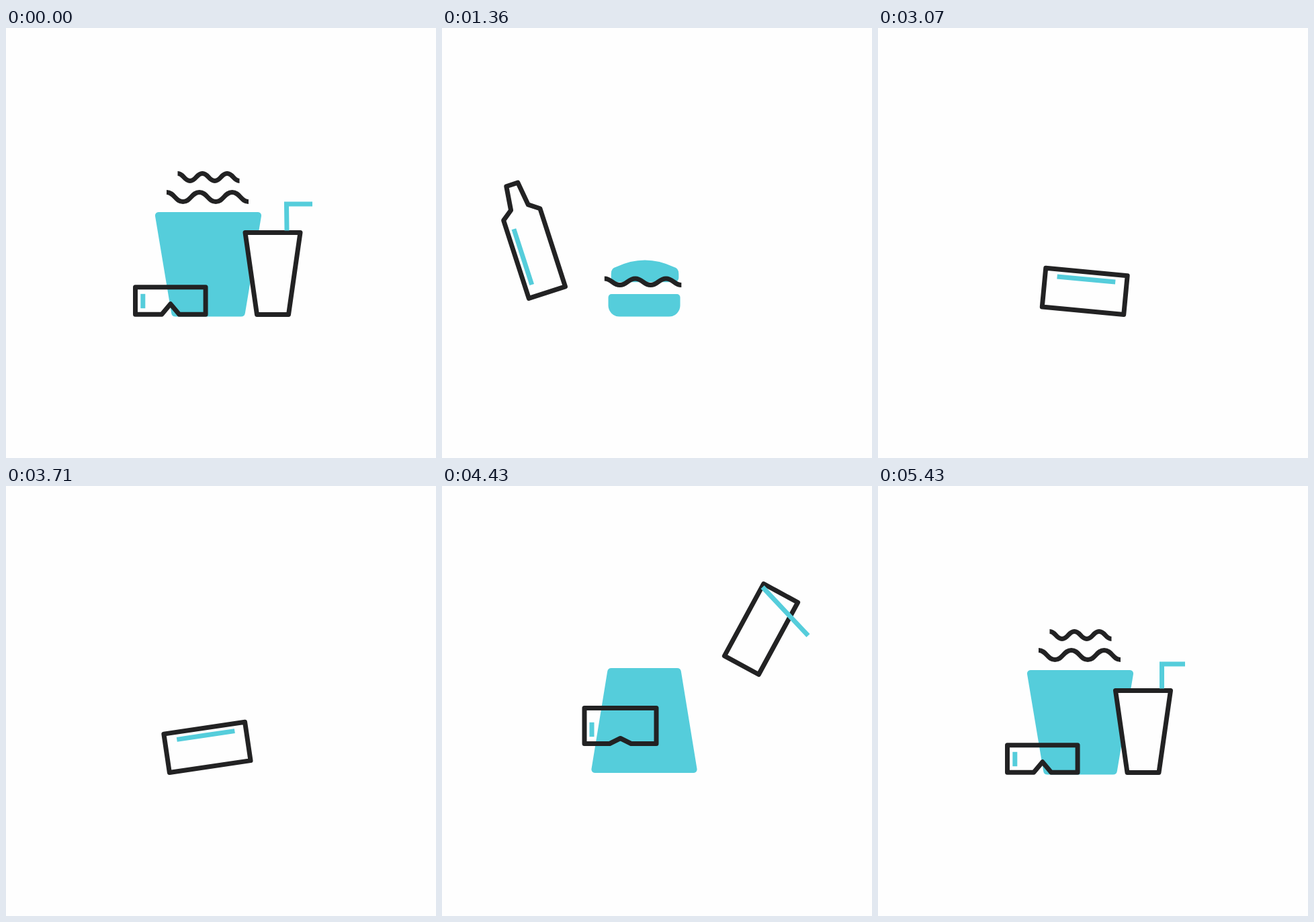
An HTML page with a canvas that plays this animation: 640 by 640 pixels, repeating every 5.71 s.

```html
<!DOCTYPE html>
<html lang="en">
<head>
<meta charset="utf-8">
<title>Snack loop</title>
<style>
  html, body { margin: 0; height: 100%; overflow: hidden; background: #fefefe; }
  canvas { display: block; }
</style>
</head>
<body>
<canvas id="stage" width="640" height="640"></canvas>
<script>
const ctx = document.getElementById('stage').getContext('2d');
const LOOP = 5710, FLOOR = 426.5, TEAL = '#55cddb', INK = '#222223', PAPER = '#fefefe';

const progress = (t, from, to) => Math.min(1, Math.max(0, (t - from) / (to - from)));
const ease = (t, from, to) => { const u = progress(t, from, to); return u * u * (3 - 2 * u); };
const bump = (t, from, to) => Math.sin(Math.PI * progress(t, from, to));

// Eases a list of values through moves of the form [from, to, target].
const tween = (t, values, ...moves) => moves.reduce((current, [from, to, target]) =>
  current.map((v, i) => v + (target[i] - v) * ease(t, from, to)), values);

function at(x, y, degrees, scale, draw) {
  if (scale < .01) return;
  ctx.save();
  ctx.translate(x, y);
  ctx.rotate(degrees * Math.PI / 180);
  ctx.scale(scale, scale);
  draw();
  ctx.restore();
}

function line(points, color, closed, fill) {
  ctx.beginPath();
  points.forEach(p => ctx.lineTo(...p));
  if (closed) ctx.closePath();
  if (fill) { ctx.fillStyle = fill; ctx.fill(); }
  ctx.lineJoin = closed ? 'round' : 'miter';
  ctx.strokeStyle = color;
  ctx.lineWidth = 7;
  ctx.stroke();
}

// top y, half top, bottom y, half bottom, top radius, bottom radius
const UPRIGHT = [274, 80, 429.5, 54, 5, 6], PILL = [405.5, 53.5, 429.5, 53.5, 12, 12],
  LOWER_BUN = [395, 53.5, 429.5, 53.5, 4, 17], FLAT = [430, 54, 430, 79, 0, 0],
  UPTURNED = [271, 54, 427, 79.5, 6, 5];

function bucket(t) {
  const x = 301;
  const [top, a, bottom, b, rTop, rBottom] = tween(t, UPRIGHT, [350, 740, PILL],
    [1000, 1450, LOWER_BUN], [2080, 2450, FLAT], [3750, 4200, UPTURNED], [4480, 4860, UPRIGHT]);
  if (bottom - top < 1) return;
  ctx.beginPath();
  ctx.moveTo(x, top);
  ctx.arcTo(x + a, top, x + b, bottom, rTop);
  ctx.arcTo(x + b, bottom, x - b, bottom, rBottom);
  ctx.arcTo(x - b, bottom, x - a, top, rBottom);
  ctx.arcTo(x - a, top, x, top, rTop);
  ctx.closePath();
  ctx.fillStyle = TEAL;
  ctx.fill();
}

function upperBun(t) {
  const [y, scale] = tween(t, [420, 0], [1000, 1450, [373.5, 1]], [2080, 2450, [430, 0]]);
  at(302, y, 0, scale, () => {
    ctx.beginPath();
    ctx.moveTo(-48, -25);
    ctx.quadraticCurveTo(0, -48, 48, -25);
    ctx.quadraticCurveTo(56, -23, 56, -14);
    ctx.arcTo(56, 0, 0, 0, 7);
    ctx.arcTo(-56, 0, -56, -14, 7);
    ctx.lineTo(-56, -14);
    ctx.quadraticCurveTo(-56, -23, -48, -25);
    ctx.fillStyle = TEAL;
    ctx.fill();
  });
}

function wave([x, y, degrees, half, amp]) {
  if (half < .5) return;
  at(x, y, degrees, 1, () => {
    ctx.beginPath();
    ctx.moveTo(-2.5 * half, -amp);
    for (let i = 0; i < 5; i++) {
      const from = (i - 2.5) * half, side = i % 2 ? amp : -amp;
      ctx.bezierCurveTo(from + half * .47, side, from + half * .53, -side, from + half, -side);
    }
    ctx.strokeStyle = INK;
    ctx.lineWidth = 7;
    ctx.stroke();
  });
}

// centre x, centre y, degrees, half wavelength, amplitude
const LOWER_STEAM = [300, 251.5, 0, 24.4, 7], LETTUCE = [299, 386, 0, 22.8, 4.7],
  UPPER_STEAM = [301.5, 222, 0, 18.4, 5.5], HIDDEN = [301, 280, 0, 0, 0];

const lowerWave = t => wave(tween(t, LOWER_STEAM, [860, 1450, LETTUCE],
  [2080, 2450, [300, 425, 0, 0, 0]], [2500, 4900, HIDDEN], [4930, 5430, LOWER_STEAM]));

const upperWave = t => wave(tween(t, UPPER_STEAM, [640, 790, [320, 205, 12.5, 18, 5.5]],
  [790, 1300, [345, 330, 50, 0, 0]], [1300, 4900, HIDDEN],
  [4930, 5180, [301, 190, 0, 19, 6]], [5180, 5430, UPPER_STEAM]));

// half width, half height, notch half width, notch height, bar x, bar y
const SPECTACLES = [52.3, 20.3, 13, 15.5, -41, .5], LIFTED = [52, 20.3, 13, 13, -38, -4],
  GOGGLES = [53.5, 26.5, 16, 8, -42.5, 5.5];

function glasses(t) {
  const rest = [244.8, 406, 0, 1];
  const [x, y, degrees, scale] = tween(t, rest, [500, 790, [254.7, 371.3, 4.7, 1]],
    [790, 1300, [150, 375, -25, 0]], [1300, 3800, [300, 395, 0, 0]],
    [3850, 4250, [265.5, 357, 0, 1]], [4430, 4860, rest]);
  const [w, h, notch, rise, barX, barY] = tween(t, SPECTACLES, [500, 790, LIFTED],
    [1300, 3800, GOGGLES], [4430, 4860, SPECTACLES]);
  at(x, y, degrees, scale, () => {
    line([[-w, -h], [w, -h], [w, h], [notch, h], [0, h - rise], [-notch, h], [-w, h]], INK, true);
    line([[barX, barY - 10.7], [barX, barY + 10.7]], TEAL);
  });
}

// half bottom, half top, neck 0..1
const CUP = [23.5, 41, 0], BOTTLE = [28.5, 28.5, 1], TICKET = [29, 29, 0];
// three points beside the vessel's centre
const STRAW = [21, -64, 20.5, -103.5, 59, -103.5], SHORT = [13, -64, 5, -97, 18, -99.5],
  BAR = [-18, 43, -18, 0, -18, -44], STRAIGHT = [-28, -56, 19, -40.5, 66, -25],
  BENT = [28, -64, 28, -100.5, 62.5, -100.5];

// One outline is cup, bottle, ticket and cup again; it stands on the floor unless lifted.
function vessel(t) {
  let [x, lift, degrees] = tween(t, [397, 0, 0], [70, 560, [450, 4.3, 12.7]],
    [620, 1380, [137, 24, -18]], [1380, 1860, [225.5, 0, .7]], [2000, 2700, [304.5, 0, 90]],
    [3850, 4430, [475, 146, 28.5]], [4430, 4860, [418, 0, 4]], [4860, 5430, [394.5, 0, 0]]);

  const since = Math.max(0, t - 3000);
  const strength = (5.7 + .004 * since + 6 * bump(t, 3070, 3710)) * (1 - ease(t, 3710, 3900));
  const rock = strength * Math.sin(2 * Math.PI * since / 400);
  degrees += rock;
  x += rock * .6;

  const angle = degrees * Math.PI / 180;
  const y = FLOOR - lift - 61 * Math.abs(Math.cos(angle)) - 29 * Math.abs(Math.sin(angle));
  const [b, a, neck] = tween(t, CUP, [790, 1380, BOTTLE], [2000, 2450, TICKET], [4430, 4860, CUP]);
  const [x1, y1, x2, y2, x3, y3] = tween(t, STRAW, [250, 790, SHORT], [790, 1300, BAR],
    [3750, 4430, STRAIGHT], [4430, 4860, BENT]);
  const right = [[9, -61 - 47 * neck], [13.5, -61 - 11 * neck], [a, -61], [b, 61]];
  const left = right.map(([px, py]) => [-px, py]).reverse();
  at(x, y, degrees, 1, () => {
    line([...right, ...left], INK, true, PAPER);
    line([[x1, y1], [x2, y2], [x3, y3]], TEAL);
  });
}

const start = performance.now();
function show() {
  const t = (performance.now() - start) % LOOP;
  ctx.fillStyle = PAPER;
  ctx.fillRect(0, 0, 640, 640);
  [upperWave, bucket, upperBun, lowerWave, glasses, vessel].forEach(part => part(t));
  requestAnimationFrame(show);
}
show();
</script>
</body>
</html>
```
